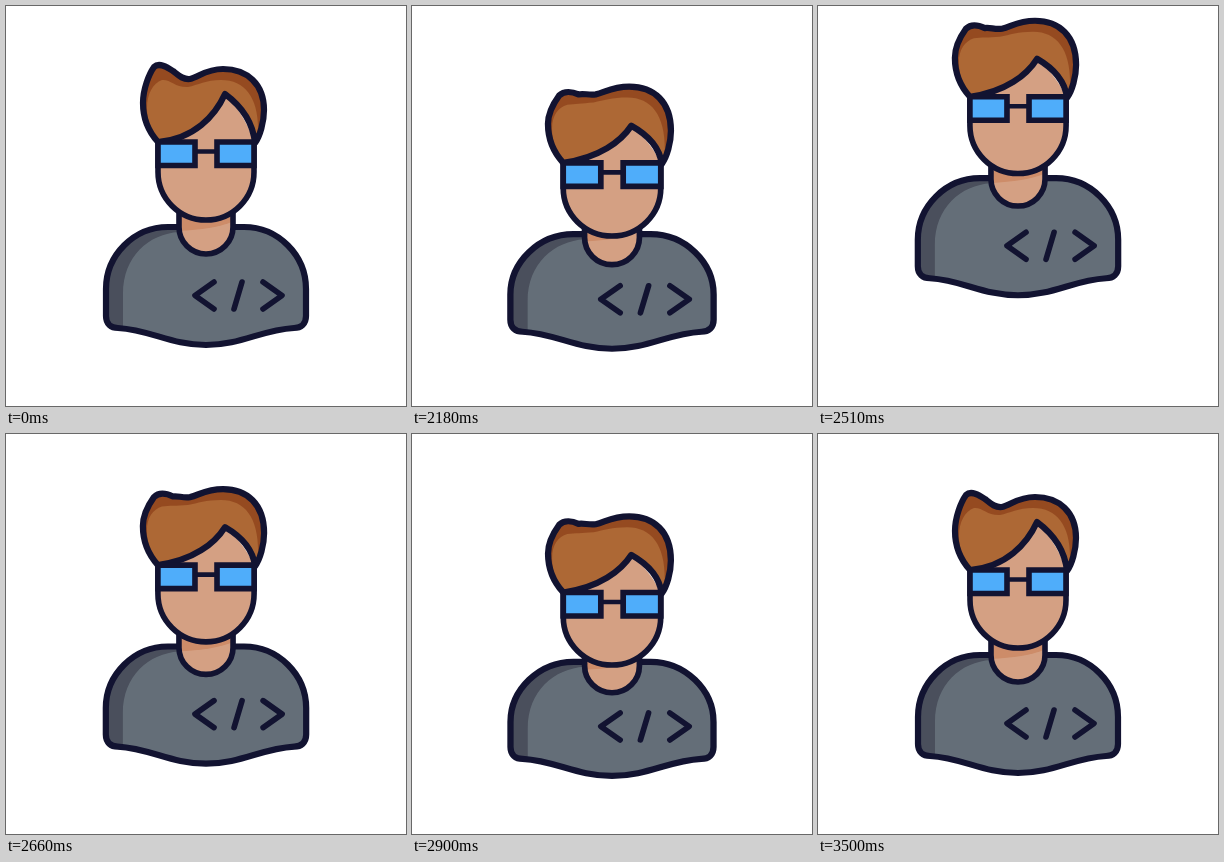
An HTML page that plays this animation: 400x400 px, repeating every 3.56 s.

```html
<!DOCTYPE html>
<html lang="en">
<head>
<meta charset="utf-8">
<title>Jumping coder</title>
<style>
html, body { margin: 0; width: 100%; height: 100%; overflow: hidden; background: #fff; }
svg { display: block; width: 100vw; height: 100vh; }
.line { fill: none; stroke: #121331; stroke-width: 5.6; stroke-linecap: round; stroke-linejoin: round; }
.outer { stroke-width: 6.2; }
.bridge { stroke-width: 4.6; }
.skin { fill: #d4a083; }
.lens { fill: #4fadfa; stroke-linejoin: miter; }
</style>
</head>
<body>
<svg viewBox="0 0 400 400">
  <defs>
    <clipPath id="bodyClip"><path class="bodyShape"/></clipPath>
    <clipPath id="neckClip"><path d="M173 190V221a27 27 0 0 0 54 0V190Z"/></clipPath>
    <clipPath id="hairClip"><path class="hairShape"/></clipPath>
  </defs>
  <g id="all">
    <g id="body">
      <path class="bodyShape" fill="#646e78"/>
      <g clip-path="url(#bodyClip)"><path class="bodyShade" fill="#4a4f5c"/></g>
      <path class="bodyShape line outer"/>
      <path class="line" d="M208 276 189 289.500 208 303M236 276 228 303M257 276 276 289.500 257 303"/>
    </g>
    <g id="neck">
      <path class="skin" d="M173 190V221a27 27 0 0 0 54 0V190Z"/>
      <g clip-path="url(#neckClip)"><path fill="#cd8c69" d="M170 190H230V214C216 221 195 224 170 225Z"/></g>
      <path class="line" d="M173 205V221a27 27 0 0 0 54 0V205"/>
    </g>
    <path class="face skin"/>
    <path class="jaw line"/>
    <g id="head">
      <path class="hairShape" fill="#954a20"/>
      <g clip-path="url(#hairClip)"><path class="hairLight" fill="#ad6835"/></g>
      <path class="hairShape line outer"/>
      <path class="line bridge" d="M189 145.500H211"/>
      <path class="line lens" d="M152 136H189V159.500H152ZM211 136H248V159.500H211Z"/>
    </g>
  </g>
</svg>
<script>
const LOOP = 3560, START = 2000, STEP = 30;

// [time after START, value]: crouch, flight, landing, settling
const lift = [[-50, 0], [130, 7], [465, -53], [765, 7], [1060, -2.4], [1260, 2], [1470, 0]];
const squash = [[0, 0], [140, 20], [280, 4.5], [680, 4.5], [850, 22], [1080, 0]];
const flat = [[0, 0], [160, 1.1], [280, 1], [680, 1], [850, 1.2], [1080, -.2], [1280, 0]];

const ease = p => (1 - Math.cos(Math.PI * p)) / 2;

function at(track, t) {
  const i = track.findIndex(key => key[0] > t);
  if (i < 0) return 0;
  const [t0, a] = track[i - 1], [t1, b] = track[i];
  return a + (b - a) * ease((t - t0) / (t1 - t0));
}

const setD = (name, d) =>
  document.querySelectorAll('.' + name).forEach(el => el.setAttribute('d', d));
const place = (id, value) => document.getElementById(id).setAttribute('transform', value);
const shift = (id, y) => place(id, `translate(0 ${y})`);

function drawBody(s) {
  const u = s * .2, top = 221 + u, bend = 249 + u, side = 283 + u / 2;
  setD('bodyShape', `M173 ${top}H162C128 ${top} 100 ${bend} 100 ${side}V310C100 318 105 322 112 322
    C145 324 165 339 200 339C235 339 255 324 288 322C295 322 300 318 300 310
    V${side}C300 ${bend} 272 ${top} 238 ${top}H227Z`);
  setD('bodyShade', `M90 210H173V${226 + u}C143 ${228 + u} 117 ${bend + 1} 117 ${288 + u}V345H90Z`);
}

function drawFace(y, s, f) {
  const brow = 138 + y + s, jaw = 166 + y + s * .72;
  const chin = `V${jaw}a48 48 0 0 0 96 0V${brow}`;
  setD('jaw', `M152 ${brow}${chin}`);
  setD('face', `M152 ${brow}${chin}Q242 ${brow - 25 + f * 6} 219 ${brow - 50 + f * 10}Z`);
}

function drawHair(f) {
  const lock = f * 7, crown = -f * 3, dip = -f * 5;
  const fringe = `C247 ${118 + f * 4} 238 ${102 + f * 7} 219 ${88 + f * 10}
    C209 ${110 + f * 4} 188 ${133 - f * 2} 152 136Z`;
  setD('hairShape', `M152 136C142 125 137 112 137 97C137 ${83 + lock / 2} 143 ${68 + lock} 148 ${61 + lock}
    C153 ${56 + lock} 161 ${61 + lock / 2} 167 ${65 + lock / 3}
    C172 ${69 + dip / 2} 177 ${74 + dip} 184 ${73 + dip}
    C193 ${71 + dip} 200 ${63 + crown} 217 ${63 + crown}
    C241 ${63 + crown} 258 ${78 + crown} 258 104C258 116 254 130 249 137${fringe}`);
  setD('hairLight', `M152 138C144 125 141 112 141 102C141 88 147 ${77 + lock / 2} 156 ${74 + lock / 2}
    C164 ${73 + lock / 2} 170 ${82 + dip} 182 ${81 + dip}
    C192 ${79 + dip} 200 ${74 + crown} 215 ${74 + crown}
    C239 ${74 + crown} 252 ${92 + crown} 252 122L249 138${fringe}`);
}

function draw(y, s, f) {
  const wide = 1 + Math.max(0, y) * .0025 + s * .0004;
  place('all', `translate(200 0) scale(${wide} 1) translate(-200 0)`);
  drawBody(s);
  drawFace(y, s, f);
  drawHair(f);
  shift('body', y);
  shift('neck', y + s * .4);
  shift('head', y + s);
}

function tick(now) {
  const t = Math.floor((now % LOOP - START) / STEP) * STEP;
  draw(...[lift, squash, flat].map(track => t < STEP ? 0 : at(track, t)));
  requestAnimationFrame(tick);
}
tick(performance.now());
</script>
</body>
</html>
```
